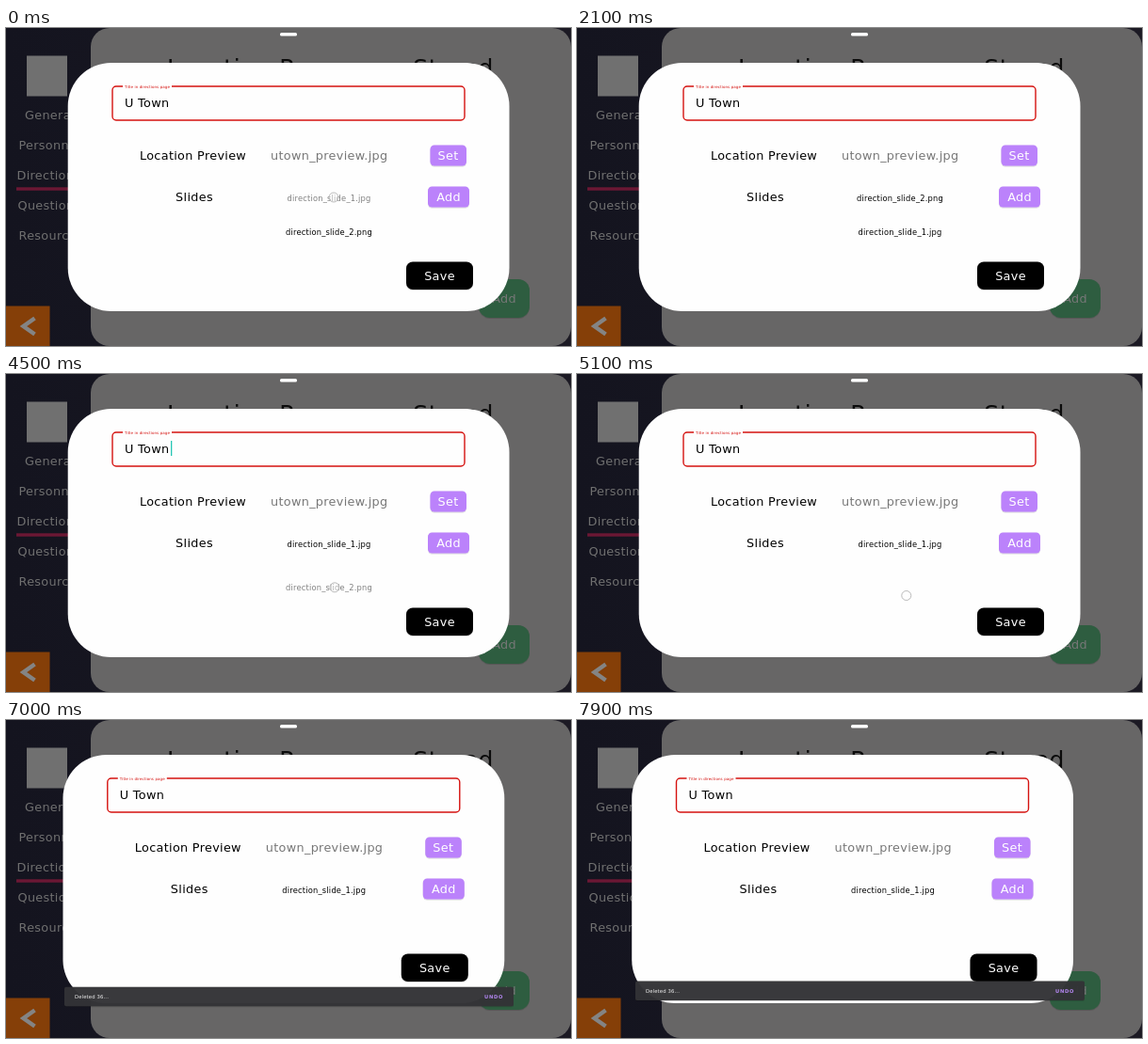
Recreate the animation shown at these times as an HTML page. Size 600x338 px, loop 8000 ms.

```html
<!DOCTYPE html>
<html lang="en">
<head>
<meta charset="utf-8">
<style>
html, body { margin: 0; width: 100%; height: 100%; overflow: hidden; background: #171720; }
svg { display: block; width: 600px; height: 338px; font: 12.8px "DejaVu Sans", sans-serif; }
text { letter-spacing: .025em; }
.mid { text-anchor: middle; }
.side { fill: #707070; }
.slide { font-size: 8.3px; text-anchor: middle; }
.btn { fill: #fff; text-anchor: middle; }
</style>
</head>
<body>
<svg viewBox="0 0 600 338">
  <defs>
    <linearGradient id="bg"><stop stop-color="#14141f"/><stop offset="1" stop-color="#1c1a24"/></linearGradient>
    <filter id="shadow" x="-20%" y="-20%" width="140%" height="160%">
      <feDropShadow dx="0" dy=".6" stdDeviation=".6" flood-opacity=".25"/>
    </filter>
  </defs>
  <rect width="600" height="338" fill="url(#bg)"/>

  <!-- Dimmed page -->
  <rect x="22" y="29.5" width="43" height="43" fill="#707070"/>
  <g class="side">
    <text x="20" y="97">General</text>
    <text x="13.500" y="129">Personnel</text>
    <text x="11.500" y="161">Directions</text>
    <text x="12.500" y="193">Questions</text>
    <text x="13.500" y="225">Resources</text>
  </g>
  <rect x="11" y="169.3" width="70" height="3.400" fill="#6b1734"/>
  <rect y="295.500" width="46.500" height="42.500" fill="#853f08"/>
  <path d="M30.5 308.5 18.5 317l12 8.500" fill="none" stroke="#848484" stroke-width="4.5"/>
  <rect x="90" width="510" height="338" rx="20" fill="#676666"/>
  <text x="171" y="50.700" font-size="25" fill="#0b0b0b">Location Resources Stored</text>
  <rect x="502" y="267" width="54" height="41" rx="12" fill="#2f5d40" filter="url(#shadow)"/>
  <text x="529" y="292" class="mid" fill="#787878">Add</text>
  <rect x="291" y="5" width="18" height="3.600" rx="1.500" fill="#fff"/>

  <!-- Dialog -->
  <g id="dialog">
    <rect x="65.700" y="37" width="468.800" height="264" rx="46" fill="#fefefe"/>
    <rect x="113" y="62" width="374" height="36" rx="4" fill="none" stroke="#d5120f" stroke-width="1.400"/>
    <rect x="124" y="60" width="52" height="4" fill="#fefefe"/>
    <text x="126" y="63.800" font-size="4" fill="#d5120f">Title in directions page</text>
    <text x="126" y="83.500">U Town</text>
    <rect id="caret" x="175" y="71" width="1.300" height="16" fill="#26c6b5"/>
    <text x="142" y="140">Location Preview</text>
    <text x="281" y="140" fill="#777">utown_preview.jpg</text>
    <text x="200" y="184" class="mid">Slides</text>
    <g fill="#bb82fb" filter="url(#shadow)">
      <rect x="450.500" y="124.500" width="38.500" height="22" rx="4.500"/>
      <rect x="448" y="168.500" width="44" height="22" rx="4.500"/>
      <rect x="425" y="248.500" width="71" height="29.500" rx="7" fill="#000"/>
    </g>
    <g class="btn">
      <text x="469.500" y="140">Set</text>
      <text x="470" y="184">Add</text>
      <text x="460.500" y="268">Save</text>
    </g>
    <text id="slide1" class="slide" x="343" y="3">direction_slide_1.jpg</text>
    <text id="slide2" class="slide" x="343" y="3">direction_slide_2.png</text>
  </g>

  <circle id="pointer" r="5" fill="#fff" fill-opacity=".4" stroke="#aaa" stroke-width=".8"/>

  <g id="snack">
    <rect x="62" y="277.500" width="477" height="20.500" rx="2" fill="#343436" fill-opacity=".96" filter="url(#shadow)"/>
    <text x="73" y="290" font-size="5.300" fill="#eee">Deleted 36...</text>
    <text x="508" y="290" font-size="5.200" font-weight="600" style="letter-spacing: .13em" fill="#b688f5">UNDO</text>
  </g>
</svg>
<script>
const LOOP = 8000;
const el = id => document.getElementById(id);
const [dialog, caret, slide1, slide2, pointer, snack] =
  ["dialog", "caret", "slide1", "slide2", "pointer", "snack"].map(el);

const within = (t, a, b) => t >= a && t < b;
const show = (node, on) => node.setAttribute("visibility", on ? "visible" : "hidden");
const place = (node, x, y) => node.setAttribute("transform", `translate(${x} ${y})`);

// Eased interpolation through [time, value] pairs.
function track(t, keys) {
  for (let i = 1; i < keys.length; i++) {
    const [t0, v0] = keys[i - 1], [t1, v1] = keys[i];
    if (t < t1) {
      const p = Math.max(0, (t - t0) / (t1 - t0));
      return v0 + (v1 - v0) * p * p * (3 - 2 * p);
    }
  }
  return keys[keys.length - 1][1];
}

function draw(t) {
  const top = 181, low = 216.5;
  place(slide1, 0, track(t, [[400, top], [1050, 224.5], [1500, 224.5], [1700, low], [4250, low], [4500, top]]));
  place(slide2, 0, track(t, [[1015, low], [1265, top], [3900, top], [4700, 236], [5300, 236], [5400, low]]));
  slide1.setAttribute("fill", t < 1600 ? "#808080" : "#000");
  slide2.setAttribute("fill", within(t, 3700, 5000) ? "#808080" : "#000");
  show(slide2, t < 4900 || within(t, 5400, 6800));

  place(pointer,
    track(t, [[1600, 348], [2900, 350], [4700, 349], [6300, 354]]),
    track(t, [[400, 180], [1050, 225.5], [1700, 225.5], [2800, 179.5], [3900, 179.5], [4700, 235.5], [5300, 235.5], [6200, 218]]));
  show(pointer, t < 1600 || within(t, 2900, 5300) || within(t, 6200, 6800));

  place(dialog, track(t, [[6800, 0], [7100, -7], [7900, -7.5]]), 0);
  show(caret, within(t % 1000, 300, 800));
  show(snack, t >= 6800);
  place(snack, 0, track(t, [[6800, 62], [7050, 0]]));
}

function frame(now) {
  draw(now % LOOP);
  requestAnimationFrame(frame);
}
draw(0);
requestAnimationFrame(frame);
</script>
</body>
</html>
```
